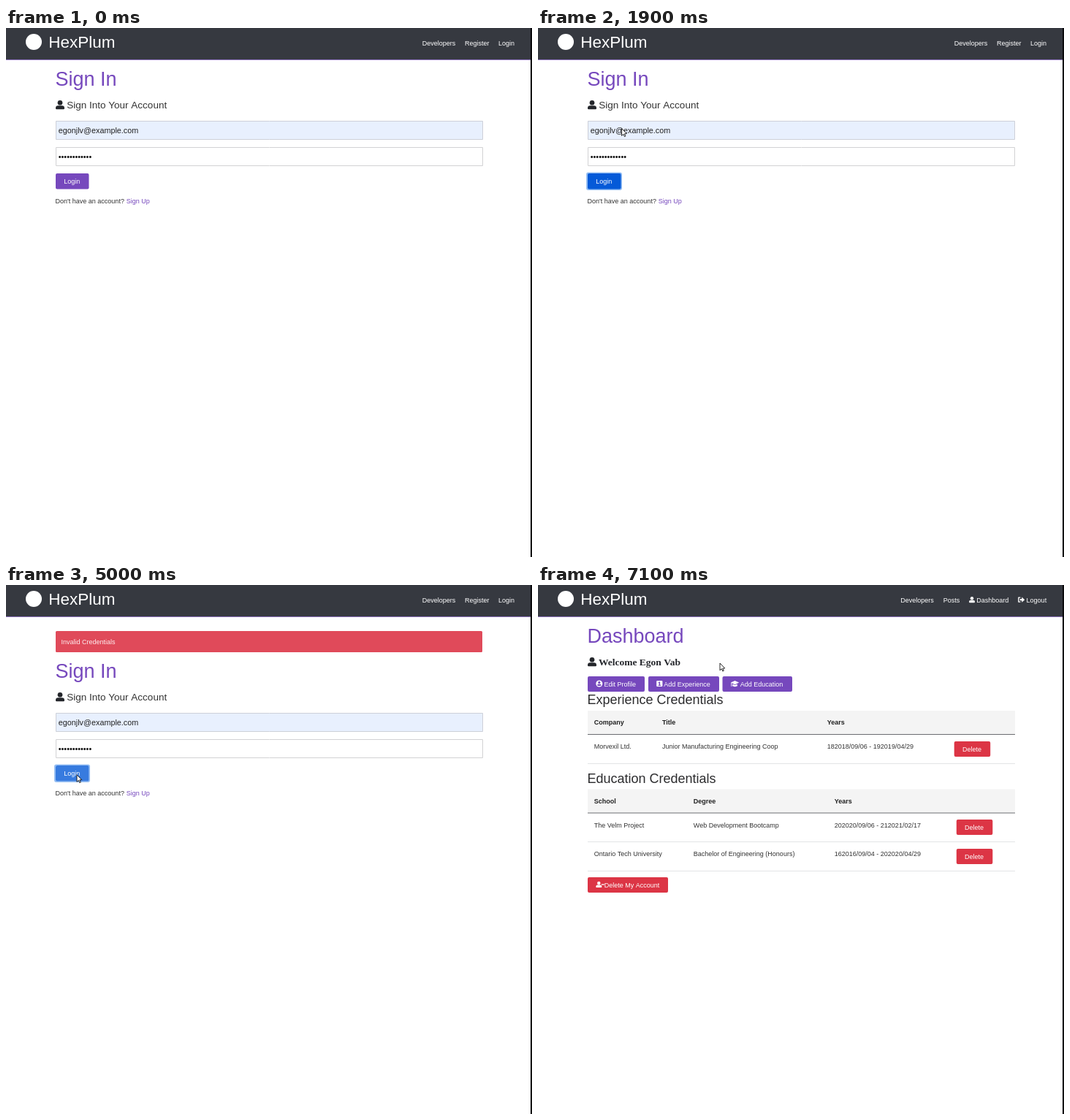
An HTML page with a canvas that plays this animation: 720 by 724 pixels, repeating every 7.2 s.

```html
<!DOCTYPE html>
<html lang="en">
<head>
<meta charset="utf-8">
<title>Sign In</title>
<style>
html, body { margin: 0; width: 100%; height: 100%; overflow: hidden; background: #fff; }
canvas { display: block; }
</style>
</head>
<body>
<canvas id="stage" width="720" height="724"></canvas>
<script>
const ctx = document.getElementById('stage').getContext('2d');
const LOOP = 7200, STEP = 100;
const SANS = '"Liberation Sans", Arial, sans-serif';
const SERIF = '"Liberation Serif", "Times New Roman", serif';
const PURPLE = '#7648bd', DARK = '#363940', INK = '#333', RED = '#dc3545', BLUE = '#055ad8';

// time, x, y of the pointer
const PATH = [
  [100, 708, 706], [300, 655, 688], [600, 240, 297], [800, 195, 190], [1100, 190, 184],
  [1400, 97, 212], [1600, 101, 210], [1700, 122, 188], [2000, 112, 120], [2300, 84, 88],
  [2700, 81, 86], [2900, 90, 110], [3200, 173, 228], [3400, 173, 231], [4300, 173, 231],
  [4700, 97, 259], [5200, 97, 260], [5800, 636, 181], [6300, 612, 186], [7100, 249, 107]
];

const between = (t, a, b) => t >= a && t < b;

function pointer(t) {
  for (let i = 1; i < PATH.length; i++) {
    const [t0, x0, y0] = PATH[i - 1], [t1, x1, y1] = PATH[i];
    if (t <= t1) {
      const k = (t - t0) / (t1 - t0), e = k * k * (3 - 2 * k);
      return [x0 + (x1 - x0) * e, y0 + (y1 - y0) * e];
    }
  }
  return PATH[PATH.length - 1].slice(1);
}

function text(str, x, y, size = 9, color = INK, weight = 'normal', face = SANS) {
  ctx.font = `${weight} ${size}px ${face}`;
  ctx.fillStyle = color;
  ctx.fillText(str, x, y);
}

function rect(x, y, w, h, color) {
  ctx.fillStyle = color;
  ctx.fillRect(x, y, w, h);
}

function round(x, y, w, h, color, r = 2) {
  ctx.fillStyle = color;
  ctx.beginPath();
  ctx.roundRect(x, y, w, h, r);
  ctx.fill();
}

function frame(x, y, w, h, color, width, r) {
  ctx.strokeStyle = color;
  ctx.lineWidth = width;
  ctx.beginPath();
  ctx.roundRect(x, y, w, h, r);
  ctx.stroke();
}

function disc(x, y, r, color) {
  ctx.fillStyle = color;
  ctx.beginPath();
  ctx.arc(x, y, r, 0, Math.PI * 2);
  ctx.fill();
}

function poly(points, color) {
  ctx.fillStyle = color;
  ctx.beginPath();
  points.forEach(([x, y]) => ctx.lineTo(x, y));
  ctx.closePath();
  ctx.fill();
}

function userIcon(x, y, s, color) {
  disc(x + s * 0.5, y + s * 0.27, s * 0.28, color);
  round(x, y + s * 0.6, s, s * 0.42, color, [s * 0.28, s * 0.28, s * 0.1, s * 0.1]);
}

function logoutIcon(x, y) {
  ctx.strokeStyle = '#fff';
  ctx.lineWidth = 1.3;
  ctx.beginPath();
  ctx.moveTo(x + 3.4, y + 0.7);
  ctx.lineTo(x + 0.8, y + 0.7);
  ctx.lineTo(x + 0.8, y + 6.6);
  ctx.lineTo(x + 3.4, y + 6.6);
  ctx.stroke();
  rect(x + 2.7, y + 2.5, 3.5, 2.3, '#fff');
  poly([[x + 5.3, y], [x + 9.2, y + 3.65], [x + 5.3, y + 7.3]], '#fff');
}

function button(label, x, y, w, textX, color = PURPLE) {
  round(x, y, w, 21, color);
  text(label, textX, y + 13.5, 9, '#fff');
}

function nav(member) {
  rect(0, 0, 718, 43, DARK);
  rect(0, 43, 718, 1, '#8c72bd');
  disc(38, 19, 11, '#fff');
  text('HexPlum', 58.3, 27, 22.5, '#fff');
  const links = member
    ? [['Developers', 496.3], ['Posts', 554.8], ['Dashboard', 600.3], ['Logout', 668.6]]
    : [['Developers', 569.7], ['Register', 628], ['Login', 674]];
  links.forEach(([label, x]) => text(label, x, 23.6, 9, '#fff'));
  if (member) {
    userIcon(590, 16, 8, '#fff');
    logoutIcon(657, 16.5);
  }
}

function heading(title) {
  text(title, 67.5, 79, 27, PURPLE);
  userIcon(68, 99, 12, '#24262b');
}

function alertBox() {
  round(68, 63, 584, 29, '#e04a5a', 1.5);
  text('Invalid Credentials', 75.5, 80.6, 9, '#fdeef0');
}

function signIn(t) {
  const typing = between(t, 900, 1500) || between(t, 3200, 4800);
  const pressed = between(t, 1500, 3200) || t >= 4800;
  const hover = between(t, 1400, 1800) || t >= 4700;
  const dots = between(t, 1200, 4200) ? 13 : 12;

  heading('Sign In');
  text('Sign Into Your Account', 83.3, 110, 13.5);

  rect(68, 127, 585, 26, '#e8f0fe');
  frame(68.5, 127.5, 584, 25, '#cdd0d8', 1, 0);
  text('egonjlv@example.com', 71.8, 143.5, 10.8, '#222');

  if (typing) frame(68.3, 163.8, 583.7, 24.6, '#16171a', 1.7, 1.5);
  else frame(68.5, 163.5, 584, 25, '#d2d2d4', 1, 0);
  text('•'.repeat(dots), 71.8, 179.5, 10.8, '#111');

  if (pressed) round(66, 197.5, 49, 24.5, '#93bdf3', 3);
  const base = pressed ? BLUE : PURPLE;
  if (hover) round(68, 199, 45.5, 21.5, '#fff');
  ctx.globalAlpha = hover ? 0.8 : 1;
  round(68, 199, 45.5, 21.5, base);
  ctx.globalAlpha = 1;
  text('Login', 79.3, 213.3, 9, '#fff');

  text("Don't have an account?", 67.6, 240, 9);
  text('Sign Up', 164.8, 240, 9, PURPLE);
}

function table(y, heads, xs, rows, buttonX) {
  rect(68, y, 585, 32, '#f4f4f4');
  rect(68, y + 32, 585, 1, '#6b6d70');
  heads.forEach((h, i) => text(h, xs[i], y + 19.3, 9, '#222', 'bold'));
  rows.forEach((row, r) => {
    const top = y + 33 + r * 39.3;
    row.forEach((cell, i) => text(cell, xs[i], top + 19.2, 9));
    button('Delete', buttonX, Math.round(top + 8.7), 49.5, buttonX + 11.3, RED);
    rect(68, Math.round(top + 38.7), 585, 1, '#e2e4e6');
  });
}

function dashboard() {
  heading('Dashboard');
  text('Welcome Egon Vab', 83, 110, 13.5, '#24262b', 'bold', SERIF);

  button('Edit Profile', 68, 125, 78, 90.4);
  disc(83.8, 135, 4.5, '#fff');
  disc(83.8, 133.4, 1.6, PURPLE);
  round(81.2, 135.7, 5.2, 2.3, PURPLE, 1.1);

  button('Add Experience', 151, 125, 97, 172.2);
  round(162.2, 131, 8.2, 8, '#fff', 1);
  rect(165.7, 132.4, 1.4, 5.2, PURPLE);
  rect(164.6, 133.2, 1.6, 1, PURPLE);
  rect(164.6, 136.8, 3.6, 1, PURPLE);

  button('Add Education', 252.5, 125, 95.5, 276.8);
  poly([[263.8, 133.6], [269.5, 131], [275.2, 133.6], [269.5, 136.2]], '#fff');
  poly([[266.4, 135.7], [269.5, 137], [272.6, 135.7], [273, 138.3], [269.5, 139.3], [266, 138.3]], '#fff');
  rect(264.3, 134, 0.9, 4.8, '#fff');

  text('Experience Credentials', 67.5, 163.3, 18, '#2c2c2e');
  table(172, ['Company', 'Title', 'Years'], [76.8, 170, 395.8], [
    ['Morvexil Ltd.', 'Junior Manufacturing Engineering Coop', '182018/09/06 - 192019/04/29']
  ], 569.7);

  text('Education Credentials', 67.5, 270.6, 18, '#2c2c2e');
  table(279.5, ['School', 'Degree', 'Years'], [76.8, 212.8, 405.8], [
    ['The Velm Project', 'Web Development Bootcamp', '202020/09/06 - 212021/02/17'],
    ['Ontario Tech University', 'Bachelor of Engineering (Honours)', '162016/09/04 - 202020/04/29']
  ], 572.8);

  button('Delete My Account', 68, 400, 110, 90.8, RED);
  userIcon(79.3, 405.8, 8, '#fff');
  rect(86.8, 409.3, 4, 1.3, '#fff');
}

function arrow(x, y) {
  const shape = [[0, 0], [0, 9.8], [2.3, 7.7], [3.8, 11], [5.3, 10.3], [3.8, 7.2], [6.8, 7]];
  poly(shape.map(([a, b]) => [x + a, y + b]), '#fff');
  ctx.strokeStyle = '#111';
  ctx.lineWidth = 0.9;
  ctx.lineJoin = 'round';
  ctx.stroke();
}

function beam(x, y) {
  rect(x - 0.5, y - 4.5, 1, 9, '#444');
  [-4.5, 4].forEach(dy => rect(x - 2, y + dy, 4, 0.8, '#555'));
}

function draw(t) {
  const member = t >= 5200;
  const warned = between(t, 2000, 5600);
  rect(0, 0, 720, 724, '#fff');
  nav(member);
  if (warned) alertBox();
  ctx.save();
  ctx.translate(0, warned ? 48 : 0);
  if (member) dashboard();
  else signIn(t);
  ctx.restore();
  rect(718, 0, 2, 724, '#0a0a0c');

  if (t < 100) return;
  const [x, y] = pointer(t);
  const field = 163 + (warned ? 48 : 0);
  const overField = !member && x > 68 && x < 653 && between(y, field, field + 27);
  (overField ? beam : arrow)(x, y);
}

function tick(now) {
  draw(Math.floor((now % LOOP) / STEP) * STEP);
  requestAnimationFrame(tick);
}
draw(0);
requestAnimationFrame(tick);
</script>
</body>
</html>
```
